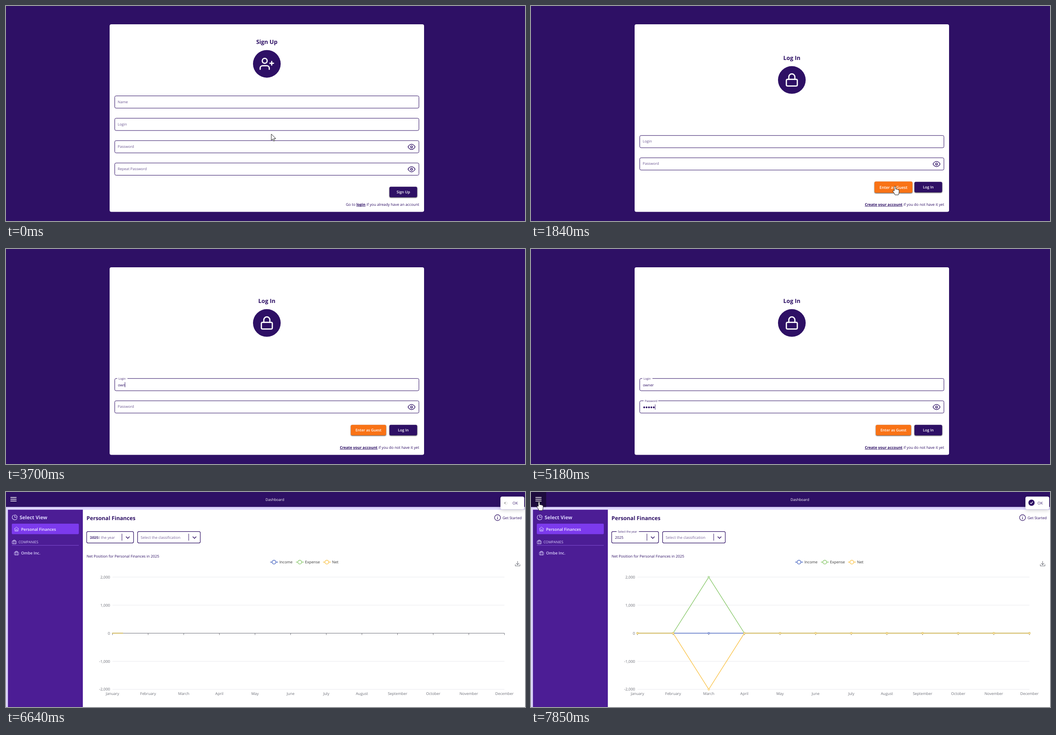
Recreate the animation shown at these times as an HTML page. Size 1162 px wide and 482 px high, loop 7.99 s.

```html
<!DOCTYPE html>
<html lang="en">
<head>
<meta charset="utf-8">
<title>Sign up, log in, dashboard</title>
<style>
  html, body { margin: 0; width: 100%; height: 100%; overflow: hidden; background: #2e1065; }
  svg { display: block; width: 1162px; height: 482px; font-family: "Open Sans", "Noto Sans", sans-serif; text-rendering: geometricPrecision; }
  text { white-space: pre; }
  .icon { fill: none; stroke-linecap: round; stroke-linejoin: round; }
  .raised { filter: drop-shadow(0 1px 1px rgba(0, 0, 0, .75)); }
  .toast { filter: drop-shadow(0 2px 4px rgba(0, 0, 0, .2)); }
</style>
</head>
<body>
<svg id="stage" viewBox="0 0 1162 482"></svg>
<script>
const LOOP = 7990;
const INK = '#2e1065', LILAC = '#ddd6fe', GREY = '#6e7079';
const MONTHS = 'January February March April May June July August September October November December'.split(' ');
const USER = 'owner';

// The screen refreshes only at these moments (ms).
const STEPS = [0, 150, 280, 410, 540, 670, 1090, 1350, 1480, 1600, 1730, 1860, 1980, 2110,
  2230, 2380, 2530, 2650, 2780, 2920, 3060, 3190, 3450, 3570, 3700, 3820, 3950, 4070, 4200, 4320,
  4690, 4820, 4950, 5180, 5440, 5590, 5730, 5980, 6260, 6380, 6500, 6640, 6790, 6930, 7060, 7200,
  7350, 7480, 7600, 7730, 7850];
const LOGIN_KEYS = [3450, 3570, 3700, 3820, 3950];
const PASSWORD_KEYS = [4690, 4820, 4950, 4950, 5180, 5440, 5590, 5730, 5980];

// Pointer: time, x, y, shape
const POINTER = [
  [0, 594, 287, 'arrow'], [150, 577, 243, 'arrow'], [280, 640, 315, 'arrow'], [410, 742, 418, 'arrow'],
  [540, 786, 464, 'arrow'], [670, 791.5, 450, 'hand'], [1480, 800, 436, 'arrow'], [1600, 806, 408, 'hand'],
  [1730, 815, 404, 'hand'], [1860, 854, 402, 'arrow'], [1980, 880, 405, 'hand'], [2110, 888, 408, 'hand'],
  [2230, 870, 410, 'hand'], [2380, 808, 405, 'hand'], [2530, 703.5, 293, 'beam'], [2650, 702, 262, 'arrow'],
  [2780, 700, 259, 'arrow'], [2920, 699, 300, 'beam'], [3060, 699.5, 304.5, 'beam'], [3450, 0, 0, 'none'],
  [7350, 520, 215, 'arrow'], [7480, 250, 120, 'arrow'], [7600, 70, 45, 'arrow'], [7730, 20, 24, 'hand'],
  [7850, 18, 22, 'hand']];
const SHAPES = {
  none: '',
  arrow: '<path d="M0 0V14L3.2 11.2 5.4 16 7.6 15 5.5 10.3H10Z" fill="#fff" stroke="#222"/>',
  hand: '<path d="M-1.6 10V1.6a1.6 1.6 0 0 1 3.2 0V6.5q1.7-.8 2.7.6 1.7-.7 2.6.7 2-.3 2.2 1.7V13q0 3-1.6 6.5H0Q-1 16-4.7 12q-.6-2.2 1.2-2.2Z" fill="#fff" stroke="#222"/>',
  beam: '<path d="M-3-6h2.4L0-5.4.6-6H3M0-5.4V5.4M-3 6h2.4L0 5.4.6 6H3" fill="none" stroke="#222"/>'
};
const ICONS = {
  userPlus: '<path d="M16 21v-2a4 4 0 0 0-4-4H5a4 4 0 0 0-4 4v2M20 8v6M23 11h-6"/><circle cx="8.5" cy="7" r="4"/>',
  lock: '<rect x="3" y="11" width="18" height="11" rx="2"/><path d="M7 11V7a5 5 0 0 1 10 0v4"/>',
  eye: '<path d="M1 12s4-8 11-8 11 8 11 8-4 8-11 8S1 12 1 12Z"/><circle cx="12" cy="12" r="3"/>',
  pie: '<path d="M21.2 15.9A10 10 0 1 1 8 2.8M22 12A10 10 0 0 0 12 2v10Z"/>',
  home: '<path d="M2 11 12 2l10 9M4 9v13h16V9M9 22v-6a3 3 0 0 1 6 0v6"/>',
  bag: '<rect x="2" y="7" width="20" height="14" rx="2"/><path d="M8 21V3h8v18"/>',
  info: '<circle cx="12" cy="12" r="11"/><path d="M12 11v6M12 7v.2"/>',
  download: '<path d="M12 2v14M6 11l6 6 6-6M2 16v6h20v-6"/>'
};

const clamp = v => Math.max(0, Math.min(1, v));
const mix = (a, b, p) => a + (b - a) * p;
const easeOut = p => 1 - (1 - clamp(p)) ** 3;
const within = (t, a, b) => t >= a && t < b;
const count = (keys, t) => keys.filter(k => k <= t).length;

const text = (x, y, size, str, fill = INK, attrs = '') =>
  `<text x="${x}" y="${y}" font-size="${size}" fill="${fill}" ${attrs}>${str}</text>`;
const BOLD = 'font-weight="700"', SEMI = 'font-weight="600"', MID = 'text-anchor="middle"', END = 'text-anchor="end"';
const rect = (x, y, w, h, fill, attrs = '') =>
  `<rect x="${x}" y="${y}" width="${w}" height="${h}" fill="${fill}" ${attrs}/>`;
const line = (d, stroke, width = 1) => `<path d="${d}" fill="none" stroke="${stroke}" stroke-width="${width}"/>`;
const icon = (name, cx, cy, scale, stroke, width = 2) =>
  `<g class="icon" transform="translate(${cx} ${cy}) scale(${scale}) translate(-12 -12)" stroke="${stroke}" stroke-width="${width}">${ICONS[name]}</g>`;

function card(title, iconName, y) {
  return rect(0, 0, 1162, 482, INK) + rect(232, 41, 704, 420.5, '#fff', 'rx="4"') +
    text(584, y - 45, 12.8, title, INK, `${BOLD} ${MID}`) +
    `<circle cx="584" cy="${y}" r="31" fill="${INK}"/>` + icon(iconName, 584, y, 1.36, '#fff');
}

// Outlined input whose label floats into the border as p goes 0..1.
function field(y, label, hasEye, p = 0, floatX = 252, gap = 0) {
  return rect(243.5, y, 681, 27.5, '#fff', `rx="3" stroke="${INK}"`) +
    (p ? rect(floatX - 3, y - 1, gap * p, 2, '#fff') : '') +
    text(mix(250, floatX, p), mix(y + 16, y + 2.6, p), mix(8.15, 6.2, p), label, INK, `opacity="${mix(.7, .9, p)}"`) +
    (hasEye ? icon('eye', 908, y + 14, .72, INK) : '');
}

function button(cx, cy, w, label, fill, hover = false, opacity = 1) {
  return `<g transform="translate(${cx} ${cy}) scale(${hover ? 1.076 : 1})">` +
    rect(-w / 2, -12, w, 23.5, fill, `rx="3" class="raised" ${opacity < 1 ? 'stroke="#9688b2"' : ''}`) +
    text(0, 3, 8.3, label, '#fff', `${MID} ${SEMI}`) + '</g>';
}

const footer = str => text(925, 447.8, 8.35, str, INK, END);
const link = str => `<tspan font-weight="700" text-decoration="underline">${str}</tspan>`;

function signUp() {
  return card('Sign Up', 'userPlus', 129.7) +
    ['Name', 'Login', 'Password', 'Repeat Password'].map((s, i) => field(201.5 + i * 50.15, s, i > 1)).join('') +
    button(889.5, 417.3, 62, 'Sign Up', INK) +
    footer(`Go to ${link('login')} if you already have an account`);
}

function logIn(t) {
  const typed = count(LOGIN_KEYS, t), dots = count(PASSWORD_KEYS, t);
  const busy = t >= 6260;
  let out = card('Log In', 'lock', 165.8) +
    field(290.3, 'Login', false, easeOut((t - 2860) / 250), 252, 23) +
    field(340.3, 'Password', true, easeOut((t - 4020) / 250), 255, 33) +
    text(250.5, 307.6, 8.3, USER.slice(0, typed));
  for (let i = 0; i < dots; i++) out += `<circle cx="${253.4 + i * 5.37}" cy="355" r="2" fill="${INK}"/>`;
  if (within(t, 3060, 4070)) out += rect(251 + typed * 4.95, 298.5, .9, 11.5, INK);
  if (within(t, 4070, 5980)) out += rect(250.7 + dots * 5.37, 348.5, .9, 11.5, INK);
  out += button(811.5, 406.3, 79, 'Enter as Guest', '#f97316', within(t, 1600, 1860) || within(t, 2380, 2650)) +
    button(889.5, 406.3, 62, 'Log In', busy ? '#9688b2' : INK, within(t, 1980, 2380), busy ? .5 : 1) +
    footer(`${link('Create your account')} if you do not have it yet`);
  return out + (busy ? loadingToast(t) : '');
}

function spinner(cx, cy, r, t) {
  return `<g transform="translate(${cx} ${cy}) rotate(${t * .36})"><circle r="${r}" fill="none" stroke="#e0e0e0"/>` +
    line(`M0 ${-r}A${r} ${r} 0 0 1 ${r} 0`, '#616161') + '</g>';
}

function loadingToast(t) {
  const p = easeOut((t - 6220) / 280), s = mix(.6, 1, p);
  return `<g class="toast" opacity="${mix(.5, 1, p)}" transform="translate(1118.2 ${mix(-33, 21.7, p)}) scale(${s})">` +
    rect(-40.2, -13.7, 80.5, 27.5, '#fcfcfd', 'rx="4"') + spinner(-27, -.7, 4, t) +
    text(-13.3, 2.6, 8.4, 'Logging in', INK, 'opacity=".85"') + '</g>';
}

function doneToast(t) {
  const s = easeOut((t - 6690) / 250), check = clamp((t - 6880) / 150);
  return rect(1107, 10.3, 53.3, 28.4, '#fff', 'rx="4" class="toast"') +
    (s ? `<g transform="translate(1120.6 24) scale(${s})"><circle r="7" fill="${INK}"/>` +
      `<path d="M-2.8.2-.8 2.2 3-2.4" fill="none" stroke="#fff" stroke-width="1.3" pathLength="1" stroke-dasharray="${check} 2"/></g>`
      : spinner(1119.5, 25, 2.6, t)) +
    text(1134, 27.8, 8.6, 'OK', INK, 'opacity=".9"');
}

function select(x, w, label, p, value = '') {
  const right = x + w;
  return rect(x, 88.7, w, 25.6, '#fff', `rx="3" stroke="${INK}" stroke-width="1.2"`) +
    line(`M${right - 26} 93.5V109`, INK) + line(`M${right - 17} 100l4 4 4-4`, INK, 1.5) +
    (p ? rect(x + 11, 87.5, 50 * p, 2.4, '#fff') : '') +
    text(mix(x + 7, x + 14, p), mix(104.8, 91, p), mix(8.25, 6.3, p), label, INK, `opacity="${mix(.65, .9, p)}"`) +
    text(x + 7.5, 104.8, 8.3, value);
}

function chart(t) {
  const left = 238.4, pitch = 79.78, zero = 316.6, unit = 62.9;
  const reveal = 878 * clamp((t - 6613) / 1000);
  const series = [['Income', '#5470c6', 0, 600, 612], ['Expense', '#91cc75', 2, 657.7, 669.5], ['Net', '#fac858', -2, 718.3, 730]];
  let out = `<clipPath id="reveal">${rect(left - 3, 180, reveal + 3 + (reveal >= 878 ? 4 : 0), 270, '#000')}</clipPath>`;
  for (let k = -2; k <= 2; k++) {
    const y = zero - k * unit;
    out += line(`M${left} ${y}H1116`, k ? '#e9eaee' : GREY) +
      text(233, y + 3, 8.6, k ? (k + ',000') : '0', GREY, END);
  }
  MONTHS.forEach((m, i) => {
    const x = left + i * pitch;
    out += line(`M${x} ${zero}v4`, GREY) + text(x, 454.8, 8.45, m, GREY, MID);
  });
  for (const [name, color, peak, markX, textX] of series) {
    const points = MONTHS.map((m, i) => [left + i * pitch, zero - (i === 2 ? peak * unit : 0)]);
    out += line(`M${markX - 8.5} 157.2h17.5`, color, 1.5) +
      `<circle cx="${markX}" cy="157.2" r="4.3" fill="#fff" stroke="${color}" stroke-width="1.5"/>` +
      text(textX, 160.2, 8.5, name, '#333') +
      `<g clip-path="url(#reveal)">${line('M' + points.join('L'), color, 1.5)}</g>` +
      points.map(([x, y], i) => {
        const r = 1.7 * clamp((reveal - i * pitch) / 120 + (reveal >= 878 ? 1 : 0));
        return r > .1 ? `<circle cx="${x}" cy="${y}" r="${r}" fill="#fff" stroke="${color}" stroke-width="1.2"/>` : '';
      }).join('');
  }
  return out + icon('download', 1145.5, 160.5, .52, GREY);
}

function dashboard(t) {
  return rect(0, 0, 1162, 482, LILAC) + rect(0, 0, 1162, 33.5, INK) +
    (t >= 7730 ? rect(0, 0, 34, 33.5, '#1d0b3d') : '') +
    line('M10 12.2h13.5M10 16.2h13.5M10 20.2h13.5', '#fff', 1.4) +
    text(602, 19.8, 8.15, 'Dashboard', '#fff', MID) +
    rect(4.3, 39.7, 168, 443, '#4c1d95') + rect(172, 39.7, 990, 443, '#fff') +
    icon('pie', 19.5, 56.8, .56, LILAC) + text(30.5, 61, 11, 'Select View', LILAC, BOLD) +
    rect(13, 71, 150, 23.6, '#7c3aed', 'rx="2"') +
    icon('home', 23.5, 83, .46, LILAC) + text(33.7, 86.6, 9, 'Personal Finances', '#f5f3ff', SEMI) +
    icon('bag', 18.5, 112, .46, LILAC) + text(28, 115, 7.9, 'COMPANIES', LILAC) +
    line('M13 119.6H163', '#7c4bd0') +
    icon('bag', 23.5, 137, .46, LILAC) + text(33.7, 140.2, 8.8, 'Ombe Inc.', LILAC, SEMI) +
    text(180.3, 62.8, 12.2, 'Personal Finances', INK, BOLD) +
    icon('info', 1100.5, 57.5, .6, INK) + text(1111.7, 60.8, 8.15, 'Get Started') +
    select(180.6, 105, 'Select the year', easeOut((t - 6640) / 250), '2025') +
    select(294.6, 140.4, 'Select the classification', 0) +
    text(180.4, 147, 8.29, 'Net Position for Personal Finances in 2025') +
    chart(t) + doneToast(t);
}

function pointer(t) {
  const [, x, y, shape] = POINTER.findLast(p => p[0] <= t);
  return `<g transform="translate(${x} ${y})">${SHAPES[shape]}</g>`;
}

const stage = document.getElementById('stage');
let shown = -1;
function draw(now) {
  const t = STEPS.findLast(s => s <= now % LOOP);
  if (t !== shown) {
    shown = t;
    const page = t < 1090 ? signUp() : t < 6640 ? logIn(t) : dashboard(t);
    stage.innerHTML = page + pointer(t);
  }
  requestAnimationFrame(() => draw(performance.now() - start));
}
const start = performance.now();
draw(0);
</script>
</body>
</html>
```
